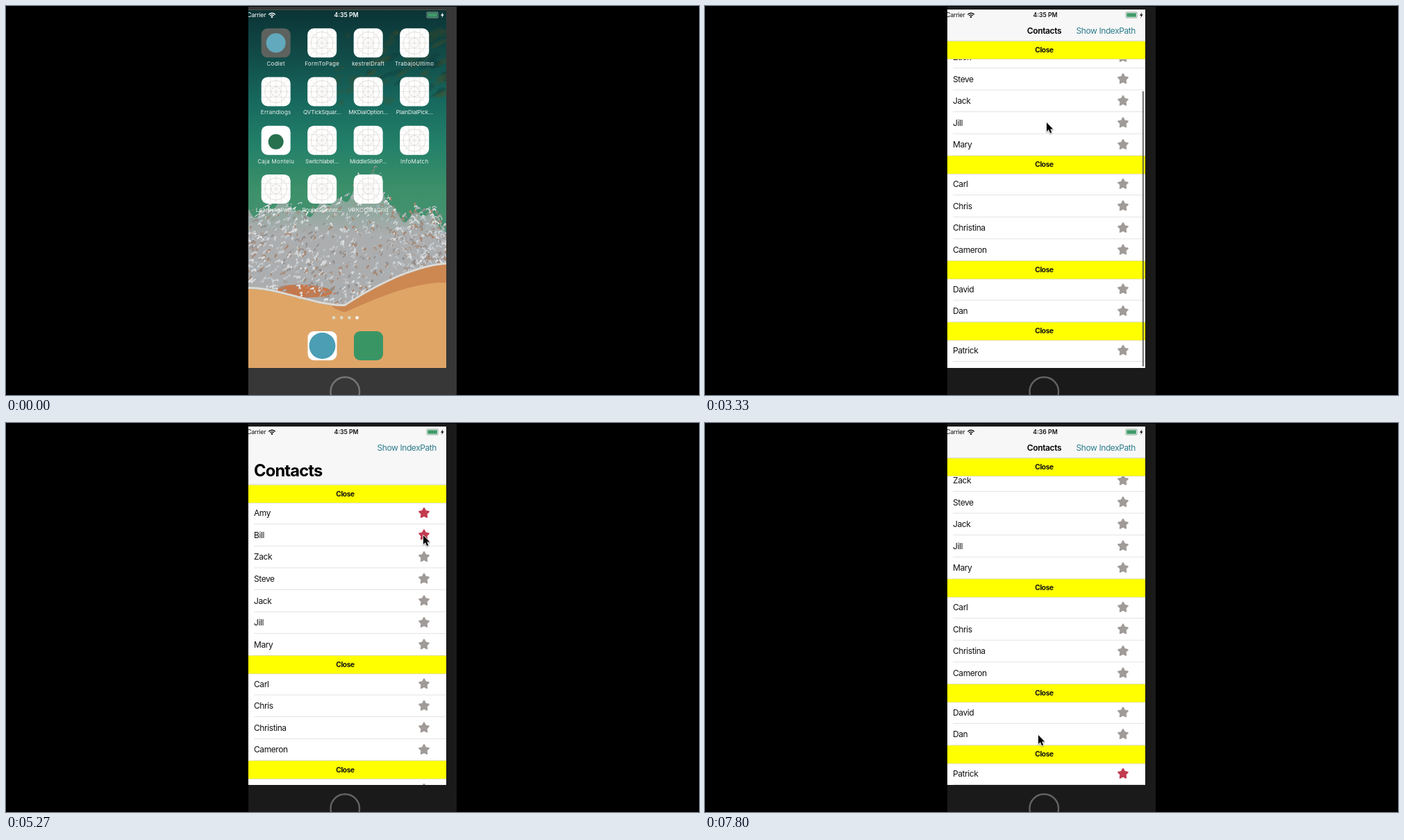
Write an HTML page with a canvas that moves like this. It is 998 px wide and 561 px high and loops after 8 s.

```html
<!DOCTYPE html>
<html lang="en">
<head>
<meta charset="utf-8">
<title>Contacts demo</title>
<style>
html, body { margin: 0; width: 100%; height: 100%; overflow: hidden; background: #000; }
canvas { display: block; }
</style>
</head>
<body>
<canvas id="stage" width="998" height="561"></canvas>
<script>
const ctx = document.getElementById('stage').getContext('2d');
const LOOP = 8000;
const LEFT = 349, RIGHT = 634, TOP = 5.5, BOTTOM = 522, WIDTH = RIGHT - LEFT;
const NAV = 50.6, REST = 89.3, ROW = 31.6, HEAD = 25.2;
const LAUNCH = 1220, LAUNCH_END = 1640, LOADED = 1700;

const apps = ['Codlet', 'FormToPage', 'kestrelDraft', 'TrabajoUltimo',
  'Errandlogs', 'QVTickSquar…', 'MKDialOption…', 'PlainDialPick…',
  'Caja Montelu', 'Switchlabel…', 'MiddleSlideP…', 'InfoMatch',
  'LearningPaths', 'RoundSpinner…', 'VRKODataGrid'];
const sections = [
  ['Amy', 'Bill', 'Zack', 'Steve', 'Jack', 'Jill', 'Mary'],
  ['Carl', 'Chris', 'Christina', 'Cameron'],
  ['David', 'Dan'],
  ['Patrick']
];
const CONTENT = sections.reduce((sum, names) => sum + HEAD + names.length * ROW, 0);
const END = BOTTOM - CONTENT;

// Pointer moves; "list" drags the list to that top, "star" is tapped on arrival.
const moves = [
  { from: 270, to: 600, x: 534, y: 275 },
  { from: 1530, to: 2070, x: 483, y: 302 },
  { from: 2180, to: 3330, x: 492, y: 168, list: END - 9 },
  { from: 3420, to: 4080, x: 510, y: 290, list: REST },
  { from: 4080, to: 4400, x: 588, y: 191 },
  { from: 4400, to: 4680, x: 601, y: 130, star: 'Amy' },
  { from: 4950, to: 5130, x: 601, y: 162, star: 'Bill' },
  { from: 5330, to: 5930, x: 506, y: 149 },
  { from: 6070, to: 6474, x: 506, y: 39, list: END },
  { from: 6474, to: 7100, x: 601, y: 502, star: 'Patrick' },
  { from: 7330, to: 7800, x: 480, y: 450 }
];

const clamp = v => Math.max(0, Math.min(1, v));
const mix = (a, b, u) => a + (b - a) * u;
const ramp = (t, from, to) => clamp((t - from) / (to - from));
const smooth = u => u * u * (3 - 2 * u);
const launched = t => 1 - (1 - ramp(t, LAUNCH, LAUNCH_END)) ** 3;

function poseAt(t) {
  const pose = { x: 409, y: 325, list: REST, stars: [] };
  for (const move of moves) {
    const u = smooth(ramp(t, move.from, move.to));
    for (const key of ['x', 'y', 'list']) pose[key] = mix(pose[key], move[key] ?? pose[key], u);
    if (move.star && t > move.to + 100) pose.stars.push(move.star);
  }
  return pose;
}

function seeded(seed) {
  return () => (seed = seed * 16807 % 2147483647) / 2147483647;
}

function box(x, y, w, h, color) {
  ctx.fillStyle = color;
  ctx.fillRect(x, y, w, h);
}

function rounded(x, y, w, h, r, color) {
  ctx.fillStyle = color;
  ctx.beginPath();
  ctx.roundRect(x, y, w, h, r);
  ctx.fill();
}

function disc(x, y, r, color) {
  ctx.fillStyle = color;
  ctx.beginPath();
  ctx.arc(x, y, r, 0, Math.PI * 2);
  ctx.fill();
}

function ring(x, y, r, width, color, from = 0, to = Math.PI * 2) {
  ctx.strokeStyle = color;
  ctx.lineWidth = width;
  ctx.beginPath();
  ctx.arc(x, y, r, from, to);
  ctx.stroke();
}

function label(text, x, y, size, { weight = 400, color = '#111', align = 'left', track = -0.035 } = {}) {
  ctx.font = `${weight} ${size}px Inter, sans-serif`;
  ctx.letterSpacing = track * size + 'px';
  ctx.textAlign = align;
  ctx.fillStyle = color;
  ctx.fillText(text, x, y + size * 0.36);
}

function clipTo(x, y, w, h) {
  ctx.beginPath();
  ctx.rect(x, y, w, h);
  ctx.clip();
}

const foamEdge = x => 292 + 9 * Math.sin(x / 11) + 5 * Math.sin(x / 4.3)
  - 52 * Math.exp(-(((x - 517) / 26) ** 2)) + Math.max(0, x - 550) * 0.3;
const shore = x => x < 488 ? mix(408, 433, smooth(ramp(x, LEFT, 488)))
  : mix(433, 373, 1 - (1 - ramp(x, 488, RIGHT)) ** 1.6);
const wetEdge = x => shore(x) + 26 * Math.sqrt(ramp(x, 470, RIGHT));

function strip(upper, lower, color) {
  ctx.fillStyle = color;
  ctx.beginPath();
  for (let x = LEFT; x <= RIGHT; x += 3) ctx.lineTo(x, upper(x));
  for (let x = RIGHT; x >= LEFT; x -= 3) ctx.lineTo(x, lower(x));
  ctx.fill();
}

function dab(x, y, rx, ry, angle, color) {
  ctx.fillStyle = color;
  ctx.beginPath();
  ctx.ellipse(x, y, rx, ry, angle, 0, Math.PI * 2);
  ctx.fill();
}

function drawWallpaper() {
  const random = seeded(77);
  const sea = ctx.createLinearGradient(0, TOP, 0, 330);
  ['#0b3335', '#114b48', '#17685e', '#238069', '#3c9069', '#4a9275']
    .forEach((color, i) => sea.addColorStop(i / 5, color));
  box(LEFT, 5, WIDTH, 520, '#dfa567');
  strip(() => 5, shore, sea);
  for (let i = 0; i < 90; i++) {
    const x = mix(450, RIGHT, Math.sqrt(random()));
    dab(x, mix(35, 140, random()), 4 + 9 * random(), 2 + 3 * random(), -0.5,
      i % 3 ? 'rgba(80,74,32,.2)' : 'rgba(12,48,48,.25)');
  }
  strip(shore, wetEdge, '#cd8852');

  const foam = ctx.createLinearGradient(0, 235, 0, 330);
  foam.addColorStop(0, 'rgba(150,175,165,.45)');
  foam.addColorStop(1, '#acadae');
  strip(foamEdge, shore, foam);
  dab(430, 411, 40, 9, 0.05, '#c5784c');

  const tones = ['#d3d7da', '#c3c8cc', '#938d8a', '#a8866f', '#dfe1e2', '#a9b3bb'];
  ctx.lineCap = 'round';
  for (let i = 0; i < 1100; i++) {
    const x = mix(LEFT, RIGHT, random());
    const y = mix(foamEdge(x) - 12, shore(x) - 3, random() ** 0.9);
    const slant = (x - 490) / 40 + 8 * random() - 4;
    ctx.strokeStyle = tones[i % tones.length];
    ctx.lineWidth = 0.6 + 1.6 * random();
    ctx.beginPath();
    ctx.moveTo(x, y);
    ctx.quadraticCurveTo(x + 5 * random(), y - 4, x + slant, y + 6 * random() - 2);
    ctx.stroke();
  }
  strip(x => shore(x) - 3, shore, '#dcdad5');
}

function drawTile(x, y, color) {
  rounded(x - 21, y - 21, 42, 42, 9, color);
}

function drawTemplateIcon(x, y) {
  drawTile(x, y, '#fff');
  ctx.strokeStyle = '#dedbd6';
  ctx.lineWidth = 0.6;
  ctx.beginPath();
  for (const d of [-8, 0, 8]) {
    ctx.moveTo(x + d, y - 20); ctx.lineTo(x + d, y + 20);
    ctx.moveTo(x - 20, y + d); ctx.lineTo(x + 20, y + d);
  }
  for (const s of [-1, 1]) {
    ctx.moveTo(x - 18, y - 18 * s); ctx.lineTo(x + 18, y + 18 * s);
  }
  ctx.stroke();
  for (const r of [7, 16]) ring(x, y, r, 0.7, '#d2cec8');
}

function drawIcons(pressed) {
  apps.forEach((name, i) => {
    const x = 388.7 + i % 4 * 66.5, y = 53.3 + Math.floor(i / 4) * 70.2;
    if (name === 'Codlet') {
      drawTile(x, y, '#5d625e');
      disc(x, y, 14, '#62a9bd');
    } else if (name === 'Caja Montelu') {
      drawTile(x, y, '#fff');
      disc(x, y + 2, 11, '#27714f');
    } else {
      drawTemplateIcon(x, y);
    }
    if (pressed && i === apps.length - 1) drawTile(x, y, 'rgba(0,0,0,.45)');
    label(name, x, y + 30, 8, { color: '#eef3f1', align: 'center', track: name.endsWith('…') ? -0.02 : 0.035 });
  });
  for (let i = 0; i < 4; i++) disc(472 + i * 11.2, 449.5, 2.3, i === 3 ? '#fff' : '#d9dccb');
  drawTile(455.5, 490, '#fff');
  disc(455.5, 490, 19, '#4b9eb4');
  drawTile(522, 490, '#3a9565');
}

function drawStatus(color, time) {
  label('Carrier', 347, 13, 9, { color });
  label(time, 490, 13, 8.7, { weight: 600, color, align: 'center', track: 0 });
  ctx.lineCap = 'butt';
  for (const r of [3.6, 6.2]) ring(383, 16.5, r, 1.5, color, -Math.PI * 0.77, -Math.PI * 0.23);
  disc(383, 15.8, 1.3, color);
  rounded(605.6, 8.6, 17, 8.8, 2, '#8fa79a');
  rounded(606.4, 9.4, 15.4, 7.2, 1.5, color === '#fff' ? '#123c3c' : '#fff');
  rounded(607.2, 10.2, 13.8, 5.6, 1, '#3f9b6a');
  ctx.fillStyle = color;
  ctx.fill(new Path2D('M629.3 9l-3.3 4.7h2.2l-.9 3.5 3.4-4.9h-2.2z'));
}

function drawStar(x, y, on) {
  ctx.fillStyle = ctx.strokeStyle = on ? '#c23c50' : '#a09b98';
  ctx.lineWidth = 2;
  ctx.lineJoin = 'round';
  ctx.beginPath();
  for (let i = 0; i < 10; i++) {
    const r = i % 2 ? 3.8 : 7.2, a = i * Math.PI / 5 - Math.PI / 2;
    ctx.lineTo(x + r * Math.cos(a), y + r * Math.sin(a));
  }
  ctx.closePath();
  ctx.fill();
  ctx.stroke();
}

function drawHeader(y) {
  box(LEFT, y - 0.6, WIDTH, HEAD + 1.8, '#d5d5bd');
  box(LEFT, y, WIDTH, HEAD + 0.5, '#ff0');
  label('Close', 488.5, y + HEAD / 2, 10.2, { weight: 700, align: 'center' });
}

function drawScrollBar(t, top, navBottom) {
  const view = BOTTOM - navBottom, over = Math.max(0, END - top);
  const y = navBottom + 2 + (navBottom - top) / CONTENT * view;
  const end = Math.min(BOTTOM - 2, y + view * view / CONTENT + 4 - over);
  const pulse = (from, to) => ramp(t, from, from + 60) * (1 - ramp(t, to, to + 250));
  const alpha = 0.85 * Math.max(pulse(2140, 4500), pulse(6030, 6950));
  rounded(630, y, 1.8, end - y, 0.9, `rgba(70,70,70,${alpha})`);
}

function drawContacts(t, { list: top, stars }) {
  const navBottom = Math.max(top, NAV);
  box(LEFT, 5, WIDTH, 520, '#fff');
  let y = top;
  const headers = sections.map(names => {
    const start = y;
    y += HEAD;
    for (const name of names) {
      label(name, 357, y + ROW / 2 - 0.4, 12);
      drawStar(602, y + ROW / 2 - 0.3, stars.includes(name));
      y += ROW;
      box(357, y - 0.8, WIDTH, 0.8, '#dcdcdc');
    }
    return { start, end: y };
  });
  for (const { start, end } of headers) drawHeader(Math.max(start, Math.min(NAV, end - HEAD)));

  box(LEFT, 5, WIDTH, navBottom - 5, '#f7f7f7');
  box(LEFT, navBottom - 0.8, WIDTH, 0.8, '#cfcfcf');
  ctx.save();
  clipTo(LEFT, 49, WIDTH, 60);
  label('Contacts', 357, top - 20.5, 23.7, { weight: 700, color: '#000' });
  ctx.restore();
  ctx.save();
  ctx.globalAlpha *= 1 - ramp(top, 50, 58);
  label('Contacts', 488.5, 35.3, 12.1, { weight: 600, color: '#000', align: 'center' });
  ctx.restore();
  label('Show IndexPath', 620, 35.3, 12, { color: '#2d7c8c', align: 'right' });
  drawScrollBar(t, top, navBottom);
}

function drawLaunch(t, time) {
  const p = launched(t), scale = mix(0.4, 1, p);
  const x = mix(500.5, 340, p), y = mix(243, 5, p);
  rounded(x, y, mix(42, 297, p), mix(42, 517, p), mix(9, 2, p), '#fff');
  ctx.save();
  ctx.translate(mix(521.5, 488.5, p), y);
  ctx.scale(scale, scale);
  ctx.translate(-489, -mix(20, 5, p));
  drawStatus('#111', time);
  ctx.restore();
}

function drawPointer({ x, y }) {
  const arrow = new Path2D('M0 0v13l2.9-2.7 2.2 5 2.2-1-2.1-4.8h4z');
  ctx.save();
  ctx.translate(x, y);
  ctx.shadowColor = 'rgba(0,0,0,.4)';
  ctx.shadowBlur = 2;
  ctx.shadowOffsetY = 1;
  ctx.lineWidth = 1.6;
  ctx.lineJoin = 'round';
  ctx.strokeStyle = '#fff';
  ctx.stroke(arrow);
  ctx.shadowColor = 'transparent';
  ctx.fillStyle = '#000';
  ctx.fill(arrow);
  ctx.restore();
}

function drawHome(t, pressed, time) {
  const p = launched(t);
  drawWallpaper();
  ctx.save();
  ctx.globalAlpha = 1 - p;
  ctx.translate(521.7, 264);
  ctx.scale(1 + p * 2, 1 + p * 2);
  ctx.translate(-521.7, -264);
  drawIcons(pressed);
  ctx.restore();
  if (t < LAUNCH) drawStatus('#fff', time);
  box(LEFT, 5, WIDTH, 520, `rgba(0,38,22,${0.78 * p})`);
}

function draw(t) {
  const pose = poseAt(t);
  const time = t < 5800 ? '4:35 PM' : '4:36 PM';
  const pressed = t >= 1070;
  box(0, 0, 998, 561, '#000');
  box(LEFT, 1, 300, 560, pressed ? '#1a1a1a' : '#373737');
  ring(488.3, 556, 20.8, 2.4, pressed ? '#636363' : '#767676');

  ctx.save();
  clipTo(LEFT, TOP, WIDTH, BOTTOM - TOP);
  if (t < LAUNCH_END) drawHome(t, pressed, time);
  if (t >= LAUNCH) drawLaunch(t, time);
  if (t >= LOADED) {
    ctx.globalAlpha = ramp(t, LOADED, LOADED + 150);
    drawContacts(t, pose);
    drawStatus('#111', time);
  }
  ctx.restore();
  if (t >= 270) drawPointer(pose);
}

function tick() {
  draw(performance.now() % LOOP);
  requestAnimationFrame(tick);
}
tick();
</script>
</body>
</html>
```
